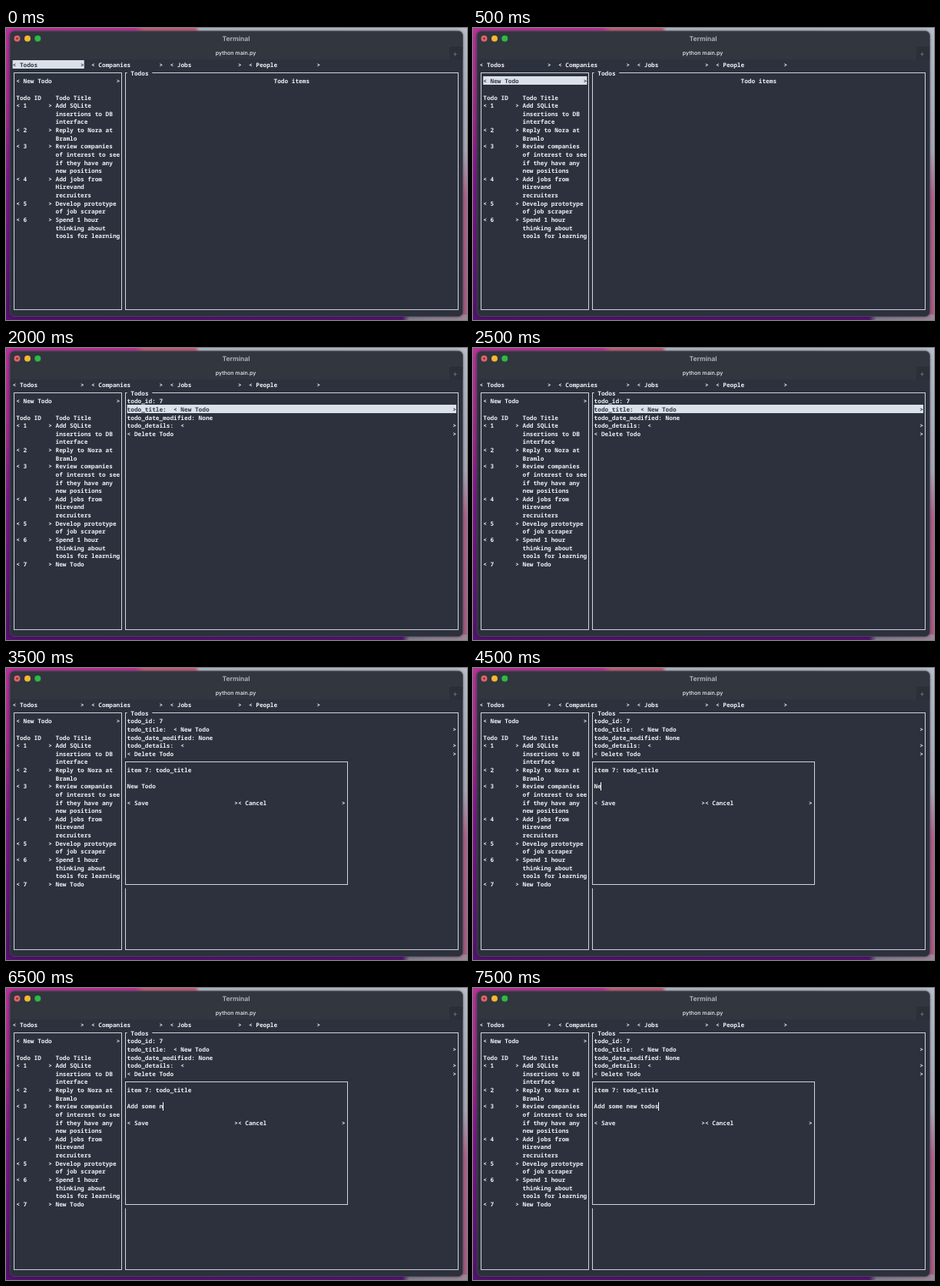
An HTML page with a canvas for the animation above (8000 ms loop, 600 by 381 pixels).

```html
<!DOCTYPE html>
<html lang="en">
<head>
<meta charset="utf-8">
<title>Terminal todo list</title>
<style>
  html, body { margin: 0; width: 100%; height: 100%; overflow: hidden; }
  canvas { display: block; width: 600px; height: 381px; }
</style>
</head>
<body>
<canvas id="stage" width="600" height="381"></canvas>
<script>
const ctx = document.getElementById('stage').getContext('2d');
const LOOP = 8000, STEP = 500;
const BG = '#2c313d', INK = '#eef0f4', LINE = '#d3d6dc', MARK = '#dae1e9';
const CW = 4.657, RH = 10.63;
const colX = c => 8.6 + c * CW;
const rowY = r => 43 + r * RH;
const crisp = v => Math.floor(v) + .5;

const todos = [
  ['Add SQLite', 'insertions to DB', 'interface'],
  ['Reply to Nora at', 'Bramlo'],
  ['Review companies', 'of interest to see', 'if they have any', 'new positions'],
  ['Add jobs from', 'Hirevand', 'recruiters'],
  ['Develop prototype', 'of job scraper'],
  ['Spend 1 hour', 'thinking about', 'tools for learning'],
  ['New Todo']
];

function rect(x, y, w, h, color) {
  ctx.fillStyle = color;
  ctx.fillRect(x, y, w, h);
}

function put(text, col, row, color = INK, weight = 600) {
  ctx.font = `${weight} 7.76px "Noto Sans Mono", "DejaVu Sans Mono", monospace`;
  ctx.textAlign = 'left';
  ctx.fillStyle = color;
  ctx.fillText(text, colX(col), rowY(row) + 8);
}

// A "< label   >" button that spans the columns from start to end.
function button(label, start, end, row, active, lead = '') {
  if (active) rect(colX(start), Math.floor(rowY(row) - .5), (end - start + 1) * CW, 11, MARK);
  const color = active ? '#343a47' : INK;
  put(`${lead}< ${label}`, start, row, color);
  put('>', end, row, color);
}

function box(c0, r0, c1, r1) {
  const x = crisp(colX(c0 + .5)), y = crisp(rowY(r0 + .5));
  ctx.strokeStyle = LINE;
  ctx.lineWidth = 1;
  ctx.strokeRect(x, y, crisp(colX(c1 + .5)) - x, crisp(rowY(r1 + .5)) - y);
}

function disc(x, y, r, color) {
  ctx.fillStyle = color;
  ctx.beginPath();
  ctx.arc(x, y, r, 0, 7);
  ctx.fill();
}

function caption(text, x, y, font, color) {
  ctx.font = `${font} Inter, Roboto, sans-serif`;
  ctx.textAlign = 'center';
  ctx.fillStyle = color;
  ctx.fillText(text, x, y);
}

function blend(x0, y0, x1, y1, ...stops) {
  const g = ctx.createLinearGradient(x0, y0, x1, y1);
  stops.forEach(([at, color]) => g.addColorStop(at, color));
  return g;
}

function desktop() {
  rect(0, 0, 600, 381, blend(0, 0, 0, 381,
    [0, '#b8329a'], [.3, '#a3258f'], [.5, '#82178c'], [1, '#54106f']));
  rect(5, 0, 595, 6, blend(0, 0, 600, 0,
    [0, '#b8329a'], [.28, '#c03497'], [.3, '#c8607c'], [.41, '#c8607c'], [.42, '#b3bac6'], [1, '#b9c0cb']));
  rect(590, 0, 10, 381, blend(0, 0, 0, 381,
    [0, '#b9c0cb'], [.42, '#a9a9b8'], [.58, '#b0608a'], [1, '#a85c82']));
  rect(5, 374, 595, 7, blend(0, 0, 600, 0,
    [0, '#54106f'], [.86, '#55126f'], [.875, '#85808e'], [1, '#9c8797']));
}

function frame() {
  ctx.save();
  ctx.beginPath();
  ctx.roundRect(5, 4, 589.5, 372.5, 6);
  ctx.shadowColor = 'rgba(0,0,0,.5)';
  ctx.shadowBlur = 4;
  ctx.fillStyle = BG;
  ctx.fill();
  ctx.shadowBlur = 0;
  ctx.clip();
  rect(5, 4, 590, 37, '#32363f');
  rect(577, 24, 18, 17, '#2b2f38');
  ctx.restore();
  ctx.strokeStyle = '#50545f';
  ctx.lineWidth = .7;
  ctx.stroke();
  disc(14.5, 13.7, 4, '#e0646a');
  disc(14.5, 13.7, 1.3, '#7c2a2e');
  disc(28, 13.7, 4, '#f3b92f');
  disc(41.3, 13.7, 4, '#2dbb40');
  caption('Terminal', 299.5, 16.6, '600 8.6px', '#b9bcc4');
  caption('python main.py', 299, 35, '500 7.1px', '#eceef2');
  caption('+', 584.5, 36.5, '400 10px', '#747985');
}

function sidebar(count, active) {
  box(0, 1, 30, 30);
  button('New Todo', 1, 29, 2, active);
  put('Todo ID', 1, 4, INK, 800);
  put('Todo Title', 12, 4, INK, 800);
  let row = 5;
  todos.slice(0, count).forEach((lines, i) => {
    button(i + 1, 1, 10, row);
    lines.forEach(line => put(line, 12, row++));
  });
}

function details(filled, active) {
  box(31, 1, 124, 30);
  rect(colX(32), rowY(1), 7 * CW, RH, BG);
  put('Todos', 33, 1);
  if (!filled) return put('Todo items', 73, 2);
  put('todo_id: 7', 32, 2);
  button('New Todo', 32, 123, 3, active, 'todo_title:  ');
  put('todo_date_modified: None', 32, 4);
  button('', 32, 123, 5, false, 'todo_details:  ');
  button('Delete Todo', 32, 123, 6);
}

function entry(t) {
  if (t < 5500) {
    const left = t < 4000 ? 8 : t < 4500 ? 6 : t < 5000 ? 2 : 1;
    return 'New Todo'.slice(0, left);
  }
  return 'Add some new todos'.slice(0, Math.round(1 + (t - 5500) * .0085));
}

function popup(t) {
  rect(colX(31), rowY(7), 63 * CW, 16 * RH, BG);
  box(31, 7, 93, 22);
  put('item 7: todo_title', 32, 8);
  const text = entry(t);
  put(text, 32, 10);
  if (t >= 4000) rect(Math.floor(colX(32 + text.length)), 149, 1, 11, '#fff');
  button('Save', 32, 62, 12);
  button('Cancel', 63, 92, 12);
}

function draw(now) {
  const t = Math.floor(now % LOOP / STEP) * STEP;
  const added = t >= 1500;
  ctx.textRendering = 'geometricPrecision';
  desktop();
  frame();
  ['Todos', 'Companies', 'Jobs', 'People'].forEach((name, i) =>
    button(name, i * 22, i * 22 + 19, 0, !i && t < 500));
  sidebar(added ? 7 : 6, t >= 500 && t < 2000);
  details(added, t >= 2000 && t < 3500);
  if (t >= 3500) popup(t);
  requestAnimationFrame(() => draw(performance.now()));
}
draw(performance.now());
</script>
</body>
</html>
```
